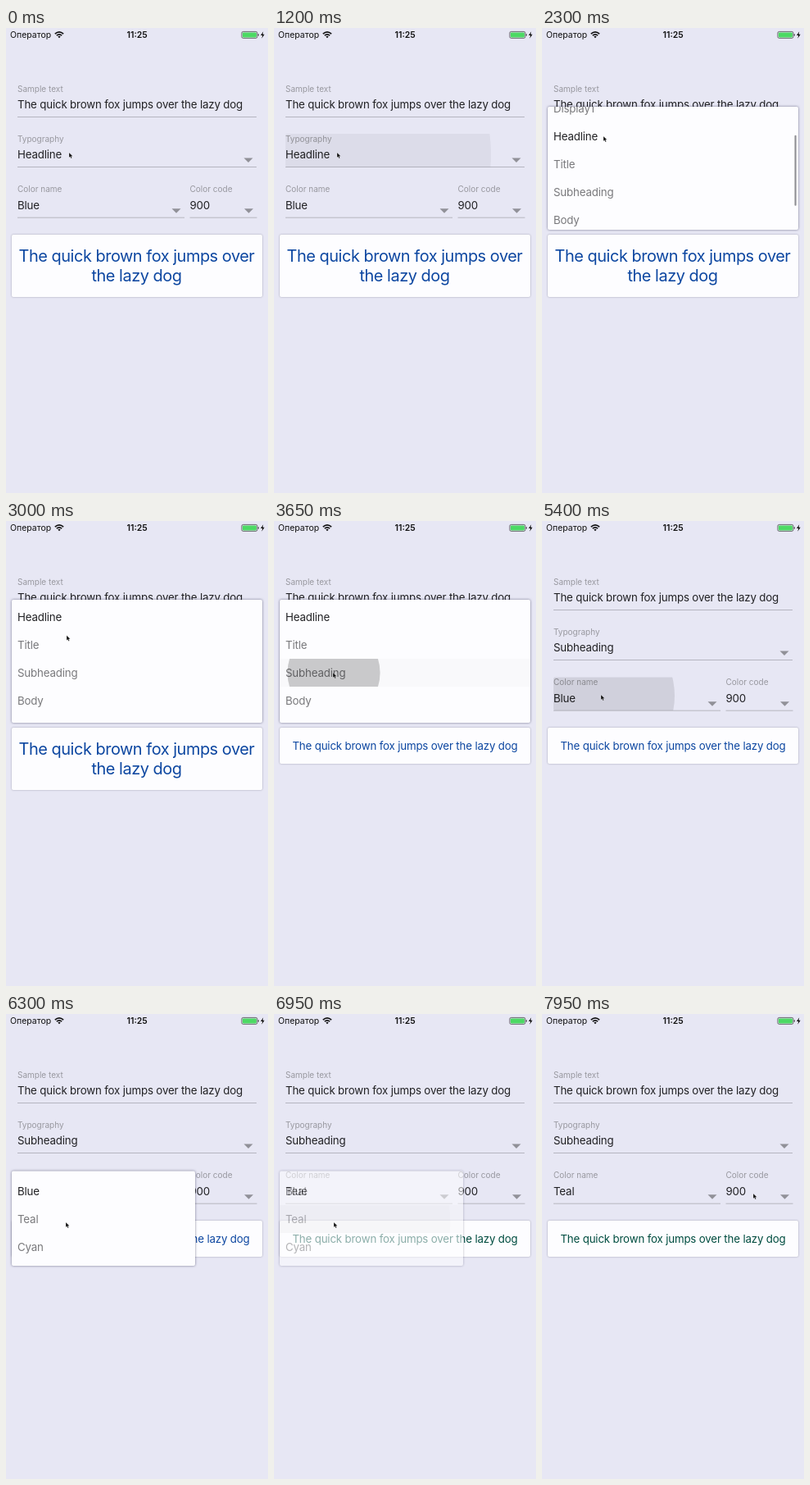
Animation, 320 px wide and 567 px high, one loop 8 s. Source, as an HTML page:

```html
<!DOCTYPE html>
<html lang="en">
<head>
<meta charset="utf-8">
<title>Dropdown demo</title>
<style>
  html, body { margin: 0; width: 100%; height: 100%; overflow: hidden; background: #e7e7f4; }
  svg { display: block; width: 100vw; height: 100vh; }
  text { font-family: Inter, "Noto Sans", sans-serif; white-space: pre; }
  .label { font-size: 10px; fill: #98989f; }
  .value { font-size: 13.3px; letter-spacing: -.17px; fill: #212124; }
  .option { fill: #79797c; }
  .chosen { fill: #212124; }
  .status { font-size: 10.5px; fill: #111; }
  .time { font-weight: 600; }
  .line { stroke: #b0b0ba; stroke-width: .9; }
  .arrow { fill: #919198; }
  .paper { fill: #fdfdff; }
  .card { filter: drop-shadow(0 .8px .9px rgba(0, 0, 30, .3)); }
  .menu { filter: drop-shadow(0 .7px 1.5px rgba(0, 0, 40, .5)); }
  .preview { text-anchor: middle; }
  .headline { font-size: 19.9px; letter-spacing: -.45px; }
  .subheading { font-size: 13.3px; letter-spacing: -.17px; }
</style>
</head>
<body>
<svg viewBox="0 0 320 567" preserveAspectRatio="none">
  <defs>
    <clipPath id="typeField"><rect x="14" y="129" width="292" height="40.5" rx="2"/></clipPath>
    <clipPath id="colorField"><rect x="14" y="190.5" width="204" height="40.5" rx="2"/></clipPath>
    <clipPath id="typeList"><rect x="7" y="96" width="306" height="150" rx="2"/></clipPath>
    <clipPath id="typeRow"><rect x="7" y="168" width="306" height="34"/></clipPath>
    <clipPath id="colorRow"><rect x="7" y="233" width="224" height="34"/></clipPath>
  </defs>
  <rect width="320" height="567" fill="#e7e7f4"/>

  <text class="status" x="5" y="12">Оператор</text>
  <g fill="none" stroke="#111" stroke-width="1.6">
    <path d="M59.8 7.2Q65 2.6 70.2 7.2M61.8 9.2Q65 6.4 68.2 9.2"/>
    <path d="M65 12.2L63.3 10.4Q65 9 66.7 10.4Z" fill="#111" stroke="none"/>
  </g>
  <text class="status time" x="147.5" y="12">11:25</text>
  <rect x="287.9" y="4.4" width="19" height="8" rx="1.7" fill="none" stroke="#333" stroke-width=".7"/>
  <rect x="288.9" y="5.4" width="17" height="6" rx=".8" fill="#4cd964"/>
  <path d="M307.7 7v2.8q1.2-.3 1.2-1.4t-1.2-1.4Z" fill="#333"/>
  <path d="M314.2 4.3L311 9h2.2l-.9 3.7 3.4-4.9h-2.2Z" fill="#111"/>

  <g id="fields"></g>
  <g clip-path="url(#typeField)"><circle id="typeRipple"/></g>
  <g clip-path="url(#colorField)"><circle id="colorRipple"/></g>

  <rect id="card" class="paper card" x="7" y="252" width="306" height="76" rx="2"/>
  <g id="big" class="preview headline" fill="#0d47a1">
    <text x="159.5" y="285.3">The quick brown fox jumps over</text>
    <text x="159.5" y="309.3">the lazy dog</text>
  </g>
  <text id="small" class="preview subheading" x="160" y="279">The quick brown fox jumps over the lazy dog</text>

  <g id="typeMenu">
    <rect class="paper menu" x="7" y="96" width="306" height="150" rx="2"/>
    <g clip-path="url(#typeList)"><g id="typeOptions"></g></g>
    <g clip-path="url(#typeRow)">
      <rect id="typeTint" x="7" y="168" width="306" height="34" opacity=".015"/>
      <circle id="typeRowRipple"/>
    </g>
    <rect id="bar" x="308.5" width="2.1" height="86" rx="1" fill="#8f8f93"/>
  </g>

  <g id="colorMenu">
    <rect class="paper menu" x="7" y="191.5" width="224" height="115.5" rx="2"/>
    <g id="colorOptions"></g>
    <g clip-path="url(#colorRow)">
      <rect id="colorTint" x="7" y="233" width="224" height="34" opacity=".015"/>
      <circle id="colorRowRipple"/>
    </g>
  </g>

  <path id="cursor" d="M0 0V6L1.4 4.8 2.4 7 3.5 6.5 2.6 4.4 4.4 4.2Z" fill="#111" stroke="#fff" stroke-opacity=".6" stroke-width=".4"/>
</svg>
<script>
const LOOP = 8000;
const PICK_TYPE = 3593, PICK_COLOR = 6660;
const FADE = 225;
const $ = id => document.getElementById(id);
const set = (id, attrs) => {
  for (const name in attrs) $(id).setAttribute(name, attrs[name]);
};
const clamp = v => Math.min(1, Math.max(0, v));

function field(label, value, x, y, right, id) {
  const arrow = id !== 'sample'
    ? `<path class="arrow" d="M${right - 15.5} ${y + 23.6}h11l-5.5 5.5Z"/>` : '';
  return `<text class="label" x="${x}" y="${y + 3.7}">${label}</text>
    <text class="value" id="${id}" x="${x}" y="${y + 24.3}">${value}</text>
    <path class="line" d="M${x} ${y + 34.5}H${right}"/>${arrow}`;
}
$('fields').innerHTML =
  field('Sample text', 'The quick brown fox jumps over the lazy dog', 14, 74, 306, 'sample') +
  field('Typography', 'Headline', 14, 135, 306, 'typeValue') +
  field('Color name', 'Blue', 14, 196.7, 218, 'colorValue') +
  field('Color code', '900', 224.5, 196.7, 306.5, 'codeValue');

const options = (names, chosen, firstY) => names.map((name, i) =>
  `<text class="value ${name === chosen ? 'chosen' : 'option'}" x="14" y="${firstY + 34 * i}">${name}</text>`).join('');
$('typeOptions').innerHTML = options(
  ['Display2', 'Display1', 'Headline', 'Title', 'Subheading', 'Body', 'Caption'], 'Headline', 123.7);
$('colorOptions').innerHTML = options(['Blue', 'Teal', 'Cyan'], 'Blue', 221);

// Eased interpolation through [time, ...values] stops.
function track(stops, t, ease = u => u) {
  const next = stops.findIndex(stop => stop[0] > t);
  if (next === 0) return stops[0].slice(1);
  if (next < 0) return stops[stops.length - 1].slice(1);
  const a = stops[next - 1], b = stops[next];
  const u = ease((t - a[0]) / (b[0] - a[0]));
  return a.slice(1).map((v, i) => v + (b[i + 1] - v) * u);
}
const smooth = u => u * u * (3 - 2 * u);

const pointer = [
  [1500, 77, 152], [1850, 77, 152], [2300, 75, 132], [2550, 75, 117],
  [2750, 75, 117], [3400, 72, 185], [4050, 72, 185], [4600, 72, 206],
  [5000, 72, 212], [5650, 72, 212], [6200, 73, 254], [7250, 73, 254],
  [7850, 258, 219]
];
const scrolling = [[1850, 34], [2300, 55], [2550, 70]];

function ripple(id, t, start, cx, cy, reach) {
  const u = (t - start) / 400;
  const p = 1 - (1 - clamp(u)) ** 1.7;
  set(id, { cx, cy, r: reach * p, opacity: u > 0 && u < 1 ? .25 * (1 - p) : 0 });
}

const shown = (t, open, close) => clamp((t - open) / FADE) * (1 - clamp((t - close) / FADE));

function draw(t) {
  const typed = t >= PICK_TYPE, tinted = t >= PICK_COLOR;
  $('typeValue').textContent = typed ? 'Subheading' : 'Headline';
  $('colorValue').textContent = tinted ? 'Teal' : 'Blue';
  set('card', { height: typed ? 44 : 76 });
  set('big', { visibility: typed ? 'hidden' : 'visible' });
  set('small', { visibility: typed ? 'visible' : 'hidden', fill: tinted ? '#004d40' : '#0d47a1' });

  ripple('typeRipple', t, 950, 78, 154, 230);
  ripple('typeRowRipple', t, PICK_TYPE, 73, 185, 242);
  ripple('colorRipple', t, 5230, 72, 213, 147);
  ripple('colorRowRipple', t, PICK_COLOR, 73, 254, 160);
  set('typeTint', { visibility: typed ? 'inherit' : 'hidden' });
  set('colorTint', { visibility: tinted ? 'inherit' : 'hidden' });

  const [scroll] = track(scrolling, t);
  set('typeOptions', { transform: `translate(0 ${-scroll})` });
  set('bar', {
    y: 98 + 62 * scroll / 104,
    opacity: clamp((t - 1850) / 100) * (1 - clamp((t - 2700) / 250))
  });
  set('typeMenu', { opacity: shown(t, 1250, PICK_TYPE + 190) });
  set('colorMenu', { opacity: shown(t, 5530, PICK_COLOR + 190) });

  const [x, y] = track(pointer, t, t > 1850 && t < 2550 ? undefined : smooth);
  set('cursor', { transform: `translate(${x} ${y})` });
}

function frame() {
  draw(performance.now() % LOOP);
  requestAnimationFrame(frame);
}
frame();
</script>
</body>
</html>
```
